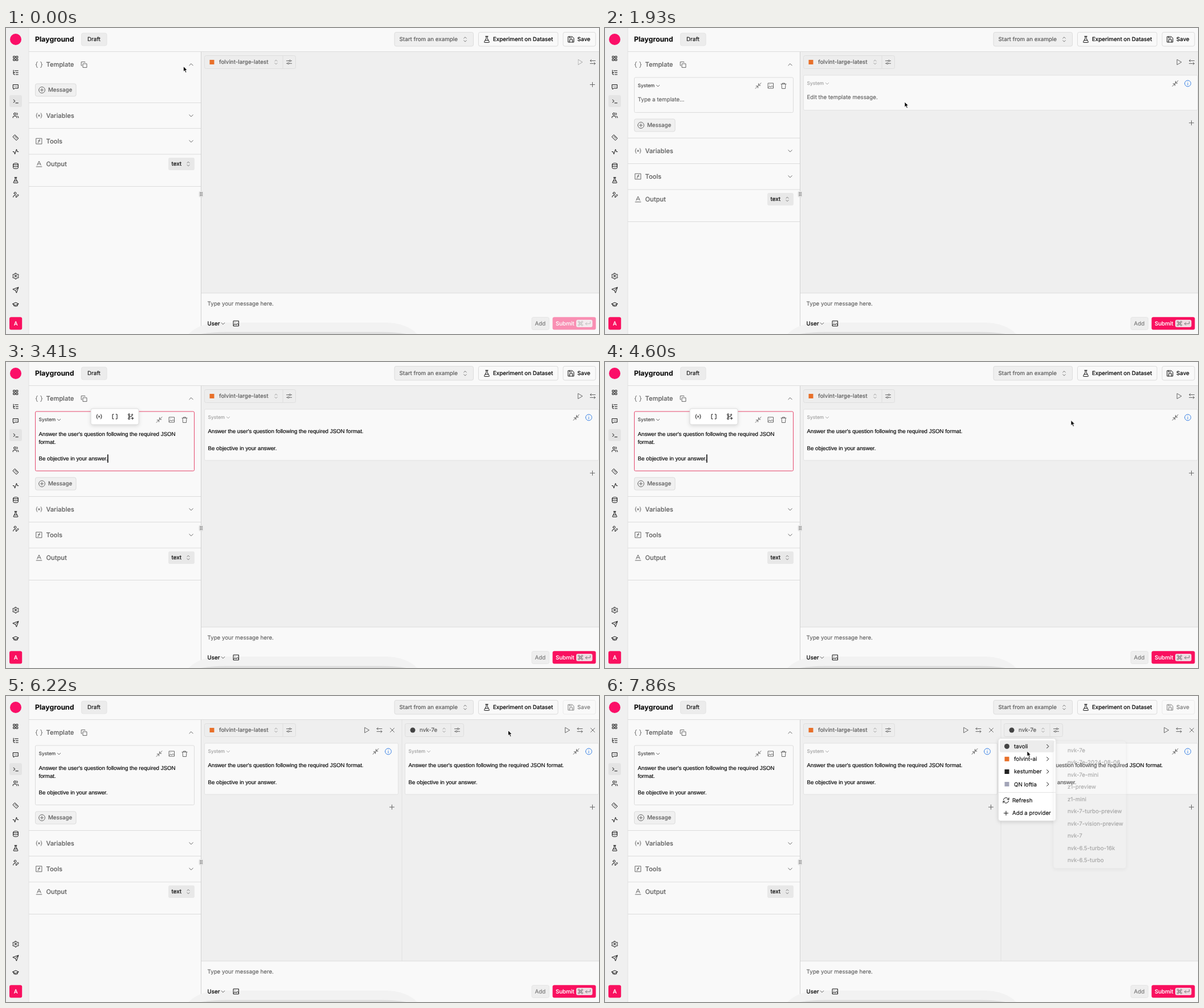
Write an HTML page that moves like this. It is 1041 px wide and 538 px high and loops after 8000 ms.

```html
<!DOCTYPE html>
<html lang="en">
<head>
<meta charset="utf-8">
<title>Prompt playground</title>
<style>
  html, body { margin: 0; width: 100%; height: 100%; overflow: hidden; background: #f9f9f9; }
  svg { display: block; width: 100vw; height: 100vh; text-rendering: geometricPrecision; }
  text { font-family: Inter, sans-serif; white-space: pre; stroke-width: .15px; }
  .code { font-family: "Liberation Sans", Arial, sans-serif; }
  .shadow { filter: drop-shadow(0 2px 3px #0002); }
</style>
</head>
<body>
<svg id="stage" viewBox="0 0 1041 538"></svg>
<script>
const LOOP = 8000, TICKS = 54;
const PINK = '#f9105f', INK = '#111', GRAY = '#666', LINE = '#dcdcdc', PANEL = '#f9f9f9';
const BODY = 9.72, TITLE = 11.1, SMALL = 8.33;

// Icons on a 24-unit grid
const ring = (x, y, r) => `M${x - r} ${y}a${r} ${r} 0 1 0 ${2 * r} 0a${r} ${r} 0 1 0 ${-2 * r} 0`;
const ICONS = {
  grid: 'M4 4h6v6H4zM14 4h6v6h-6zM4 14h6v6H4zM14 14h6v6h-6z',
  tree: 'M9 5h12M13 12h8M13 19h8M4 3v14q0 2 2 2h3M4 12h5',
  chat: 'M3 4h18v13H9l-5 4v-4H3zM8 10.5h.1M12 10.5h.1M16 10.5h.1',
  terminal: 'M4 17l6-5-6-5M12 19h9',
  users: ring(9, 7, 4) + 'M2 21v-2q0-4 4-4h6q4 0 4 4v2M16 3.2a4 4 0 0 1 0 7.6M22 21v-2q0-3-3-3.8',
  ruler: 'M2 9l7-7 13 13-7 7zM9 9l2-2M12 12l2-2M15 15l2-2',
  pulse: 'M2 12h4l3 9 6-18 3 9h4',
  database: 'M3 5c0-4 18-4 18 0s-18 4-18 0v14c0 4 18 4 18 0V5M3 12c0 4 18 4 18 0',
  flask: 'M8 2h8M10 2v7L4 20q-1 2 1 2h14q2 0 1-2l-6-11V2M7 15h10',
  userEdit: ring(10, 7, 4) + 'M3 21v-1q0-5 5-5h3M13 21l1-4 6-6 3 3-6 6z',
  gear: ring(12, 12, 3) + 'M10 2h4l1 3 3 1.5 3-1 2 3.5-2.3 2.5v2L23 16l-2 3.5-3-1-3 1.5-1 3h-4l-1-3-3-1.5-3 1L1 16l2.3-2.5v-2L1 9l2-3.5 3 1L9 5z',
  send: 'M22 2L11 13M22 2l-7 20-4-9-9-4z',
  cap: 'M1 10l11-5 11 5-11 5zM5 12v5q7 4 14 0v-5',
  braces: 'M7 3Q4 3 4 6v3q0 3-3 3 3 0 3 3v3q0 3 3 3M17 3q3 0 3 3v3q0 3 3 3-3 0-3 3v3q0 3-3 3',
  copy: 'M9 9h12v12H9zM5 15H3V3h12v2',
  variable: 'M6 4q-6 8 0 16M18 4q6 8 0 16M9 9l6 6M15 9l-6 6',
  func: 'M3 3h18v18H3zM15 7q-3-1-3 3l-1 5q0 3-3 2M9 11h6',
  letter: 'M3 21h18M6 16l6-13 6 13M8 12h8',
  down: 'M5 9l7 7 7-7',
  up: 'M5 15l7-7 7 7',
  right: 'M9 5l7 7-7 7',
  updown: 'M7 8l5-5 5 5M7 16l5 5 5-5',
  plus: 'M12 4v16M4 12h16',
  plusRing: ring(12, 12, 10) + 'M12 7v10M7 12h10',
  shrink: 'M21 3l-8 8M13 5v6h6M3 21l8-8M5 13h6v6',
  image: 'M3 3h18v18H3zM3 18l5-5 4 4 4-5 5 5M8 8h.1',
  trash: 'M3 6h18M8 6V3h8v3M5 6l1 16h12l1-16',
  info: ring(12, 12, 10) + 'M12 11v6M12 7v.1',
  play: 'M5 3l15 9-15 9z',
  swap: 'M7 3L3 7l4 4M3 7h18M17 13l4 4-4 4M21 17H3',
  close: 'M5 5l14 14M19 5L5 19',
  sliders: 'M2 7h10M18 7h4M2 17h4M12 17h10' + ring(15, 7, 3) + ring(9, 17, 3),
  save: 'M3 3h13l5 5v13H3zM7 3v5h8M7 21v-8h10v8',
  brackets: 'M8 4H4v16h4M16 4h4v16h-4',
  branch: 'M6 8v8M6 12h6q5 0 5-5M18 14v8M14 18h8' + ring(6, 19, 3) + ring(6, 5, 3) + ring(17, 5, 2),
  refresh: 'M3 10a9 9 0 0 1 16-4l3 3M22 3v6h-6M21 14a9 9 0 0 1-16 4l-3-3M2 21v-6h6',
  command: 'M9 9h6v6H9zM9 9H6a3 3 0 1 1 3-3zM15 9V6a3 3 0 1 1 3 3zM15 15h3a3 3 0 1 1-3 3zM9 15v3a3 3 0 1 1-3-3z',
  enter: 'M21 5v8H3M8 8l-5 5 5 5'
};

const icon = (name, x, y, color = GRAY, size = 13) =>
  `<path d="${ICONS[name]}" transform="translate(${x - size / 2} ${y - size / 2}) scale(${size / 24})" fill="none" stroke="${color}" stroke-width="${24 / size}" stroke-linecap="round" stroke-linejoin="round"/>`;
const text = (x, mid, str, color = INK, weight = 400, size = BODY) =>
  `<text x="${x}" y="${mid + size * .36}" fill="${color}" stroke="${color}" font-weight="${weight}" font-size="${size}">${str}</text>`;
const code = (x, mid, str) =>
  `<text class="code" x="${x}" y="${mid + 3.4}" stroke="#000" font-size="${BODY}">${str}</text>`;
const box = (x, y, right, bottom, fill, stroke = 'none', r = 3) =>
  `<rect x="${x}" y="${y}" width="${right - x}" height="${bottom - y}" rx="${r}" fill="${fill}" stroke="${stroke}"/>`;
const line = (x1, y1, x2, y2, color = LINE) => `<path d="M${x1} ${y1}L${x2} ${y2}" stroke="${color}"/>`;
const group = (opacity, content, cls = '') => `<g opacity="${opacity}" class="${cls}">${content}</g>`;
const dot = (x, y, r, color) => `<circle cx="${x}" cy="${y}" r="${r}" fill="${color}"/>`;
const square = (x, y, color) => box(x - 4, y - 4, x + 4, y + 4, color, 'none', 0);

// Moments, in ticks
const ADD = 4, FOCUS = 19, PASTE = 23, COMPARE = 36, MENU = 47, HOVER = 52, SUBMENU = 53;
const ANSWER = "Answer the user's question following the required JSON";
const OBJECTIVE = 'Be objective in your answer.';

function sidebar() {
  const places = { grid: 53.5, tree: 78.5, chat: 103.5, terminal: 128.5, users: 153.5, ruler: 192.5, pulse: 217.5,
    database: 242.5, flask: 267.5, userEdit: 293, gear: 436, send: 461, cap: 486 };
  return box(0, 0, 40, 538, '#f0f0f0', 'none', 0) + line(40, 0, 40, 538, '#e3e3e3') +
    dot(17, 20, 10, '#fb0f68') + box(6, 118, 28, 139, '#e4e4e4') +
    Object.entries(places).map(([name, y]) => icon(name, 17, y, INK, 11.5)).join('') +
    box(6, 508.3, 28.2, 530.5, PINK) + text(13.7, 519.5, 'A', '#fff', 500);
}

function header(k) {
  return line(40, 41.5, 1041, 41.5) + text(51, 20, 'Playground', INK, 700, 12.3) +
    box(132.5, 9, 177, 31, '#ececec', '#e4e4e4') + text(143, 20, 'Draft') +
    box(682, 7.5, 820.5, 32, '#efefef', '#dcdcdc') + text(690.5, 20, 'Start from an example', GRAY, 500) + icon('updown', 806, 20, '#777', 11) +
    box(829.5, 7.5, 969, 32, PANEL, LINE) + icon('flask', 844, 20, INK) + text(855, 20, 'Experiment on Dataset', INK, 500) +
    group(k < COMPARE ? 1 : .5, box(978, 7.5, 1035, 32, PANEL, LINE) + icon('save', 992, 20, INK) + text(1003, 20, 'Save', INK, 500));
}

function editor(k) {
  const focused = k >= FOCUS && k < COMPARE, pasted = k >= PASTE;
  let out = box(51.5, 87, 330.5, pasted ? 191.5 : 148.5, PANEL, focused ? '#e5486d' : LINE, 2) +
    text(57.5, 101.5, 'System', '#555', 500, SMALL) + icon('down', 93, 101.5, GRAY, 9) +
    icon('shrink', 269, 101.5) + icon('image', 291, 101.5, GRAY, 12) + icon('trash', 313.5, 101.5, GRAY, 12);
  out += pasted
    ? code(57.5, 126.5, ANSWER) + code(57.5, 141, 'format.') + code(57.5, 170, OBJECTIVE)
    : text(57.5, 126, 'Type a template...', GRAY);
  const blinkOff = k >= 26 && k < 29;
  if (focused && !blinkOff) out += pasted ? box(178, 162.5, 179.5, 177, '#000', 'none', 0) : box(57.5, 119, 59, 133, '#000', 'none', 0);
  if (focused) out += group(k > FOCUS ? 1 : .5, box(149, 82, 233, 110, '#fff', '#ddd') +
    icon('variable', 163.5, 96, INK, 12) + icon('brackets', 191, 96, INK, 12) + icon('branch', 219, 96, INK, 12), 'shadow');
  return out;
}

function leftPanel(k) {
  const d = k < ADD ? 0 : k < PASTE ? 62 : 105;
  const section = (name, y, title) => icon(name, 58, y) + text(70.5, y, title, GRAY, 500, TITLE);
  return section('braces', 64.5, 'Template') + icon('copy', 137, 64.5) + icon('up', 325, 64.5, GRAY, 11) +
    (d ? editor(k) : '') +
    `<g transform="translate(0 ${d})">` +
    box(51.5, 98, 123, 120, '#f0f0f0', '#dcdcdc') + icon('plusRing', 63, 109) + text(74, 109, 'Message', GRAY, 500) +
    [131.5, 176.5, 222, 278.5].map(y => line(40, y, 342, y)).join('') +
    section('variable', 154, 'Variables') + icon('down', 325, 154, GRAY, 11) +
    section('func', 199, 'Tools') + icon('down', 325, 199, GRAY, 11) +
    section('letter', 239, 'Output') + box(285, 228, 331, 250, '#e8e8e8') +
    text(290.5, 239, 'text', INK, 500) + icon('updown', 320, 239, '#777', 10) + '</g>';
}

function column(k, left, right, buttonEnd, model, logo) {
  const hasCard = k >= ADD, pasted = k >= PASTE, pair = k >= COMPARE;
  const bottom = pasted ? 173 : 144.5, tool = right - (pair ? 22.5 : 0);
  let out = box(left + 5.5, 48.5, buttonEnd + 22.5, 71.5, '#ededed', '#dedede') + line(buttonEnd, 48.5, buttonEnd, 71.5, '#dedede') +
    logo + text(left + 31, 60, model, GRAY, 500) + icon('updown', buttonEnd - 12, 60, '#999', 10) + icon('sliders', buttonEnd + 11, 60, GRAY, 11) +
    group(hasCard ? 1 : .5, icon('play', tool - 33, 60, GRAY, 12)) + icon('swap', tool - 11, 60, GRAY, 12) +
    (pair ? icon('close', right - 11, 60, GRAY, 12) : '') +
    icon('plus', right - 11.5, hasCard ? bottom + 22.3 : 99.5, GRAY, 12);
  if (hasCard) {
    out += box(left + 5.5, 83, right - .5, bottom, PANEL, '#e2e2e2', 2) +
      text(left + 11.5, 97.5, 'System', '#aaa', 500, SMALL) + icon('down', left + 47, 97.5, '#aaa', 9) +
      icon('shrink', right - 40, 97.5, '#555') + icon('info', right - 18, 97.5, '#3b82e6') +
      (pasted ? code(left + 11.5, 122, ANSWER + ' format.') + code(left + 11.5, 151.3, OBJECTIVE)
              : text(left + 11.5, 122, 'Edit the template message.', GRAY));
  }
  return out;
}

function rightPanel(k) {
  const pair = k >= COMPARE;
  return box(342, 42, 1041, 466, '#efefef', 'none', 0) +
    column(k, 343, pair ? 689 : 1041, 486, 'folvint-large-latest', square(361.5, 60, '#e8702a')) +
    (pair ? line(695, 42, 695, 466, '#e2e2e2') + column(k, 695, 1041, 781, 'nvk-7e', dot(714, 60, 4.5, '#444')) : '') +
    line(342.5, 42, 342.5, 538, '#d0d0d0') + box(338.5, 287, 346.5, 297.5, '#e4e4e4', 'none', 2) +
    [289.5, 292, 294.5].map(y => dot(341.3, y, .7, '#333') + dot(343.9, y, .7, '#333')).join('');
}

function composer(k) {
  return line(343, 466, 1041, 466) + text(353.5, 484.5, 'Type your message here.', GRAY) +
    '<path d="M320 538Q342 518 375 518H665Q702 518 722 538z" fill="#f2f2f2"/>' +
    '<path d="M342 538Q362 534.500 385 534.500H660Q685 534.500 703 538z" fill="#dedede"/>' +
    text(353.5, 519.5, 'User', INK, 500) + icon('down', 381, 519.5, GRAY, 10) + icon('image', 404, 519.5, INK, 12) +
    box(923, 508.5, 953.5, 530.5, '#eee', '#e6e6e6') + text(928.5, 519.5, 'Add', '#777') +
    group(k < ADD ? .45 : 1, box(959.5, 508.3, 1035.5, 530.5, PINK) + text(965, 519.5, 'Submit', '#fff', 500) +
      box(1001, 513, 1029.5, 526, '#efdce3') + icon('command', 1008.5, 519.5, '#777', 11) + icon('enter', 1021.5, 519.5, '#777', 11));
}

function menu(k) {
  const providers = [['tavoli', dot(705.5, 88.5, 4.5, '#444')], ['folvint-ai', square(705.5, 110.8, '#e8702a')],
    ['kestumber', square(705.5, 133, '#222')], ['QN loftia', square(705.5, 155, '#a3a5b8')]];
  return group(k > MENU ? 1 : .5, box(690.5, 74.5, 791.5, 219.5, '#fff', '#e2e2e2', 4) +
    (k >= HOVER ? box(693, 78, 788.5, 99, '#ececec') : '') +
    providers.map(([name, logo], i) => logo + text(718, 88.5 + i * 22.2, name) + icon('right', 777, 88.5 + i * 22.2, INK, 11)).join('') +
    line(690, 169.5, 791.5, 169.5, '#e2e2e2') +
    icon('refresh', 704, 183.5, INK, 12) + text(715, 183.5, 'Refresh') +
    icon('plus', 704, 206, INK, 11) + text(715, 206, 'Add a provider'), 'shadow');
}

function submenu() {
  const models = ['nvk-7e', 'nvk-7e-2024-08-06', 'nvk-7e-mini', 'z1-preview', 'z1-mini', 'nvk-7-turbo-preview',
    'nvk-7-vision-preview', 'nvk-7', 'nvk-6.5-turbo-16k', 'nvk-6.5-turbo'];
  return group(.33, box(787, 79, 915, 303, '#f4f4f4', '#ddd', 4) +
    models.map((name, i) => text(812, 95.5 + i * 21.5, name)).join(''), 'shadow');
}

// Pointer path: tick, x, y
const PATH = [[0, 311.5, 67.5], [3, 100, 105], [4, 82.5, 111.5], [7, 82.5, 111.5], [9, 87, 118], [10, 87, 118],
  [13, 526, 130], [14, 526, 92], [18, 125, 126], [28, 125, 126], [29, 551, 130], [30, 551, 130], [31, 818, 102.5],
  [33, 1028, 55.5], [41, 1028, 55.5], [42, 881.5, 60.5], [44, 760, 64], [45, 735.5, 64.5], [51, 735.5, 64.5], [53, 741, 97]];
const SHAPES = {
  arrow: '<path d="M0 0v9.200l2.100-2 1.600 3.700 1.700-.700-1.600-3.600h2.900z" stroke="#fff" stroke-width=".8"/>',
  hand: '<path d="M2.500 0q1.200 0 1.200 1.200v3l4 1q1.300.400 1 2l-.8 4h-5l-2.700-4q-.500-1.200.800-1.200l.300.400v-5.200q0-1.200 1.200-1.200z" stroke="#fff" stroke-width=".7"/>',
  beam: '<path d="M-2.500-6Q0-6 0-4.500 0-6 2.500-6M0-4.500v9M-2.500 6Q0 6 0 4.500 0 6 2.500 6M-1.500 1h3" fill="none" stroke="#222"/>'
};

function pointer(k) {
  if (k >= PASTE && k < 28) return '';
  const i = Math.max(1, PATH.findIndex(p => p[0] >= k));
  const [a, b] = [PATH[i - 1], PATH[i]], f = (k - a[0]) / (b[0] - a[0]);
  const x = a[1] + (b[1] - a[1]) * f, y = a[2] + (b[2] - a[2]) * f;
  const shape = k < ADD ? 'arrow' : k < 9 ? 'hand' : x < 331 ? 'beam' : 'arrow';
  return `<g transform="translate(${x} ${y})">${SHAPES[shape]}</g>`;
}

const stage = document.getElementById('stage');
let shown = -1;

function draw() {
  const t = performance.now() % LOOP;
  const k = Math.min(TICKS - 1, Math.floor((t + 6) * TICKS / LOOP));
  if (k !== shown) {
    shown = k;
    stage.innerHTML = box(0, 0, 1041, 538, PANEL, 'none', 0) + sidebar() + header(k) + leftPanel(k) + rightPanel(k) + composer(k) +
      (k >= MENU ? menu(k) : '') + (k >= SUBMENU ? submenu() : '') + pointer(k);
  }
  requestAnimationFrame(draw);
}
draw();
</script>
</body>
</html>
```
